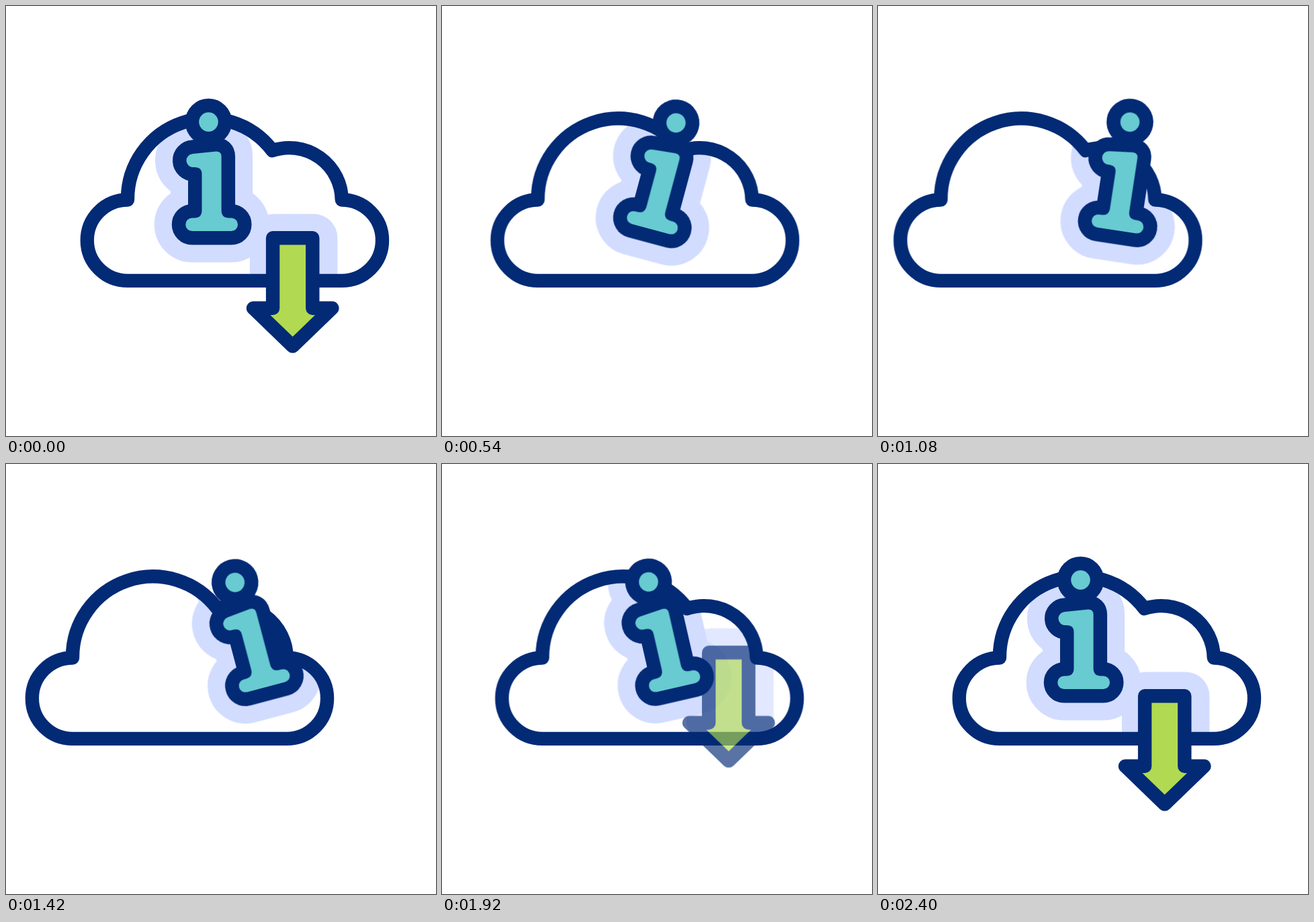
An HTML page that plays this animation: 640x640 px, repeating every 2.42 s.

```html
<!DOCTYPE html>
<html lang="en">
<head>
<meta charset="utf-8">
<title>Cloud download info</title>
<style>
  html, body { margin: 0; width: 100%; height: 100%; overflow: hidden; background: #fff; }
  svg { display: block; width: 100vw; height: 100vh; }

  .drift, .undrift, .slide, .tilt, .drop {
    animation: 2420ms cubic-bezier(.3333, 0, .6667, 1) infinite;
  }
  .drift { animation-name: drift; }
  .undrift { animation-name: undrift; }
  .slide { animation-name: slide; }
  .tilt { animation-name: tilt; transform-origin: 306px 247px; }
  .drop { animation-name: drop, fade; }

  /* 1200 ms = 49.587%, 2400 ms = 99.174% */
  @keyframes drift {
    0%, 99.174%, 100% { transform: translateX(0); }
    49.587% { transform: translateX(-90px); }
  }
  @keyframes undrift {
    0%, 99.174%, 100% { transform: translateX(0); }
    49.587% { transform: translateX(90px); }
  }
  @keyframes slide {
    0%, 99.174%, 100% { transform: translateX(0); }
    49.587% { transform: translateX(64px); }
  }
  /* 800 ms = 33.058%, 1600 ms = 66.116% */
  @keyframes tilt {
    0%, 99.174%, 100% { transform: rotate(0deg); }
    33.058% { transform: rotate(20deg); }
    66.116% { transform: rotate(-20deg); }
  }
  @keyframes drop {
    0%, 99.174%, 100% { transform: translateY(0); }
    33.058% { transform: translateY(224px); }
    66.116% { transform: translateY(-100px); }
  }
  /* out 300-500 ms, in 1800-2000 ms */
  @keyframes fade {
    0%, 12.397%, 82.645%, 100% { opacity: 1; }
    20.661%, 74.38% { opacity: 0; }
  }

  .line { stroke: #032a75; stroke-width: 20.4; stroke-linejoin: round; }
  .edge { fill: #032a75; stroke: #032a75; stroke-width: 41; stroke-linejoin: round; }
  .shade { fill: #d2dcff; stroke: #d2dcff; stroke-linejoin: round; }
</style>
</head>
<body>
<svg viewBox="0 0 640 640">
  <defs>
    <path id="cloud" d="M181 408.9A60.2 60.2 0 0 1 181 288.5A119.8 119.8 0 0 1 396.5 215.2A78.3 78.3 0 0 1 499.8 288.5A60.2 60.2 0 0 1 499.8 408.9Z"/>
    <clipPath id="inside"><use href="#cloud"/></clipPath>
    <g id="info">
      <circle cx="301.5" cy="172.6" r="14.3"/>
      <path d="M277 315.5H280Q291.5 315.5 291.5 304V250Q291.5 240 281.5 240H279A10 10 0 0 1 278 220L312.5 216.4Q320.6 216 320.6 224V304Q320.6 315.5 332 315.5H335.3A9.75 9.75 0 0 1 335.3 335H277A9.75 9.75 0 0 1 277 315.5Z"/>
    </g>
  </defs>

  <g class="drift" clip-path="url(#inside)">
    <g class="undrift">
      <rect class="shade drop" stroke="none" style="stroke:none" x="363" y="309.6" width="130.4" height="170" rx="35.6"/>
      <g class="slide"><g class="tilt">
        <use href="#info" class="shade" stroke-width="93"/>
      </g></g>
    </g>
  </g>

  <use href="#cloud" class="line drift" fill="none"/>

  <path class="line drop" fill="#b1da52" d="M397.1 345.3V449.7H368L426.7 506.3L485.5 449.7H456.3V345.3Z"/>

  <g class="slide"><g class="tilt">
    <use href="#info" class="edge"/>
    <use href="#info" fill="#67cbd1"/>
  </g></g>
</svg>
</body>
</html>
```
